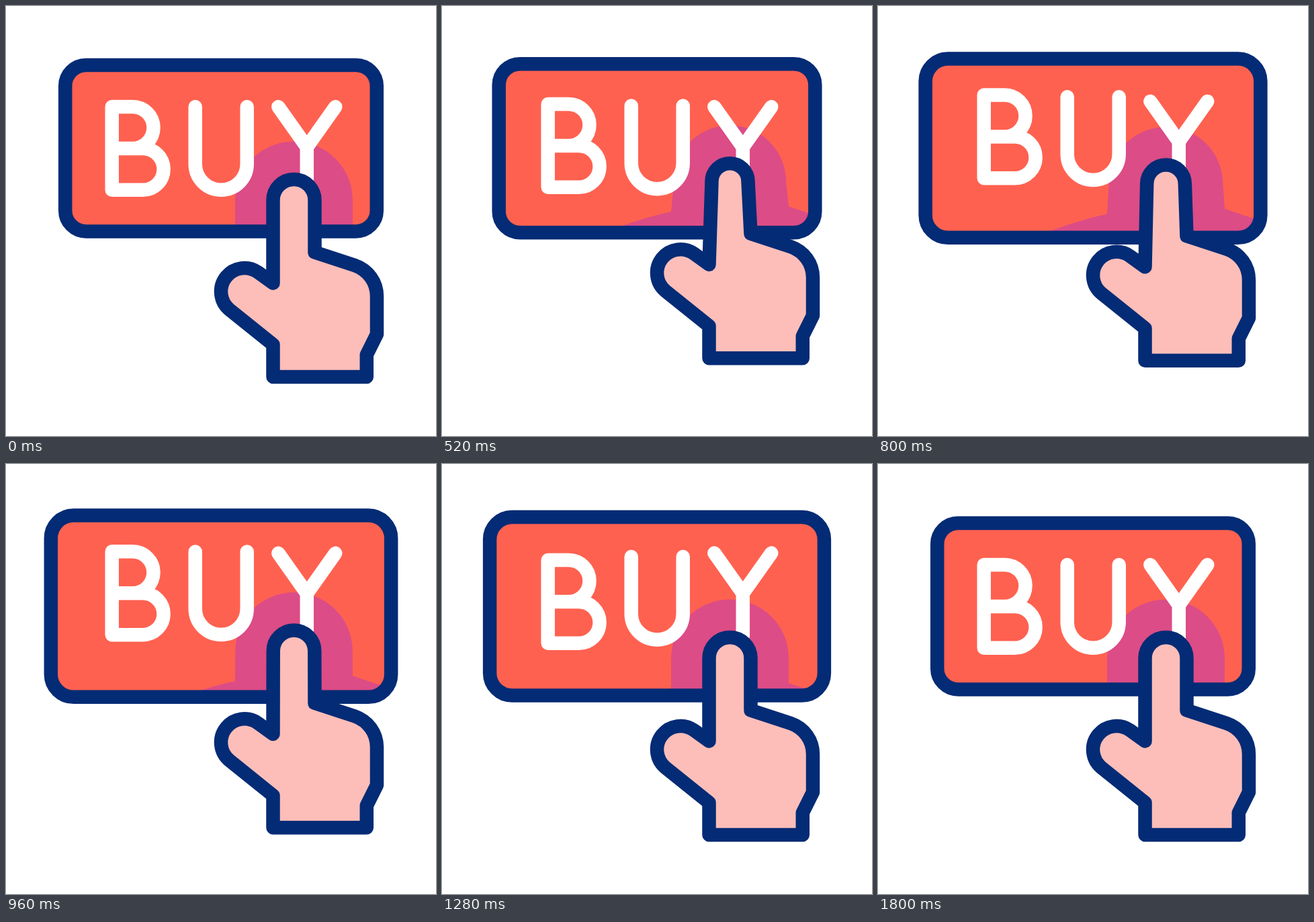
These frames come from a looping animation (640 by 640 pixels, 1920 ms). An HTML page with a canvas:

```html
<!DOCTYPE html>
<html lang="en">
<head>
<meta charset="utf-8">
<title>Buy button</title>
<style>
  html, body { margin: 0; width: 100%; height: 100%; overflow: hidden; background: #fff; }
  canvas { display: block; width: 100vmin; height: 100vmin; }
</style>
</head>
<body>
<canvas id="stage" width="640" height="640"></canvas>
<script>
const ctx = document.getElementById('stage').getContext('2d');
const LOOP = 1920, STEP = 40, LAST = 1800, LINE = 20.5;
const NAVY = '#042b75', RED = '#ff6150', PURPLE = '#dc4c86', SKIN = '#fdbeb9';

// cubic-bezier(.42, 0, .58, 1), solved by bisection
function ease(x) {
  if (x <= 0) return 0;
  if (x >= 1) return 1;
  let lo = 0, hi = 1;
  for (let i = 0; i < 24; i++) {
    const u = (lo + hi) / 2, v = 1 - u;
    if (1.26 * u * v * v + 1.74 * u * u * v + u * u * u < x) lo = u; else hi = u;
  }
  return lo * lo * (3 - 2 * lo);
}

// rises from 0 to 1, then falls back
const pulse = (t, up, upTime, down, downTime) =>
  ease((t - up) / upTime) - ease((t - down) / downTime);

function stroke(path, color) {
  ctx.strokeStyle = color;
  ctx.stroke(path);
}

function fill(path, color) {
  ctx.fillStyle = color;
  ctx.fill(path);
}

function buttonPath(grow) {
  const k = 1 + 0.0927 * grow, w = 463.6 * k, h = 247.4 * k;
  const p = new Path2D();
  p.roundRect(320 - w / 2, 211.7 - h / 2, w, h, 31 * k);
  return p;
}

function haloPath(dy, thin) {
  const p = new Path2D(), y = 289 + dy;
  p.moveTo(230, 369 + dy);
  p.quadraticCurveTo(300, 342 + dy, 341, 334 + dy);
  p.lineTo(341 + thin, y);
  p.arc(428.5, y, 87.5 - thin, Math.PI, 0);
  p.lineTo(516, 326 + dy);
  p.lineTo(600, 354.6 + dy);
  p.lineTo(600, 420);
  p.lineTo(230, 420);
  p.closePath();
  return p;
}

function handPath(dy, thin) {
  const p = new Path2D();
  const to = (x, y) => p.lineTo(x, y + dy);
  p.moveTo(397.5, 412.5 + dy);
  to(397.5 + thin, 289);
  p.arc(428.5, 289 + dy, 31 - thin, Math.PI, 0);
  to(459.5, 366.5);
  to(519, 386);
  p.bezierCurveTo(539, 393, 552, 411, 552, 432);
  return p;
}

// the whole hand is built in its rest pose and shifted by the caller
function hand(thin) {
  const p = handPath(0, thin);
  p.lineTo(552, 488.5);
  p.lineTo(536.8, 519);
  p.lineTo(536.8, 552);
  p.lineTo(397.5, 552);
  p.lineTo(397.5, 504);
  p.lineTo(333, 452.2);
  p.arc(355, 425, 35, Math.atan2(27.2, -22), Math.atan2(-28.6, 20.2));
  p.closePath();
  return p;
}

const B = new Path2D('M157.7 150H188.5A31 31 0 0 1 188.5 212H157.7ZM157.7 212H203.7A30.9 30.9 0 0 1 203.7 273.8H157.7Z');
const U = new Path2D('M281.7 150V235.2A38.5 38.5 0 0 0 358.7 235.2V150');
const Y = new Path2D('M405.3 150L447.8 210L490.3 150M447.8 210V273.7');

function shifted(dy, draw) {
  ctx.save();
  ctx.translate(0, dy);
  draw();
  ctx.restore();
}

function draw(t) {
  const dy = -28.6 * pulse(t, 0, 590, 655, 530);
  const thin = 4.2 * pulse(t, 100, 500, 640, 380);
  const button = buttonPath(pulse(t, 335, 660, 1095, 590));

  ctx.fillStyle = '#fff';
  ctx.fillRect(0, 0, 640, 640);
  ctx.lineWidth = LINE;
  ctx.lineCap = ctx.lineJoin = 'round';

  fill(button, RED);
  ctx.save();
  ctx.clip(button);
  fill(haloPath(dy, thin), PURPLE);
  ctx.restore();
  stroke(button, NAVY);

  const letters = [
    [B, pulse(t, 325, 630, 900, 645)],
    [U, pulse(t, 405, 615, 1030, 570)],
    [Y, pulse(t, 560, 540, 1131, 606)]
  ];
  for (const [path, lift] of letters) shifted(-20 * lift, () => stroke(path, '#fff'));

  shifted(dy, () => {
    const p = hand(thin);
    fill(p, SKIN);
    stroke(p, NAVY);
  });
}

function frame() {
  const t = performance.now() % LOOP;
  draw(Math.min(LAST, Math.floor(t / STEP) * STEP));
  requestAnimationFrame(frame);
}
frame();
</script>
</body>
</html>
```
